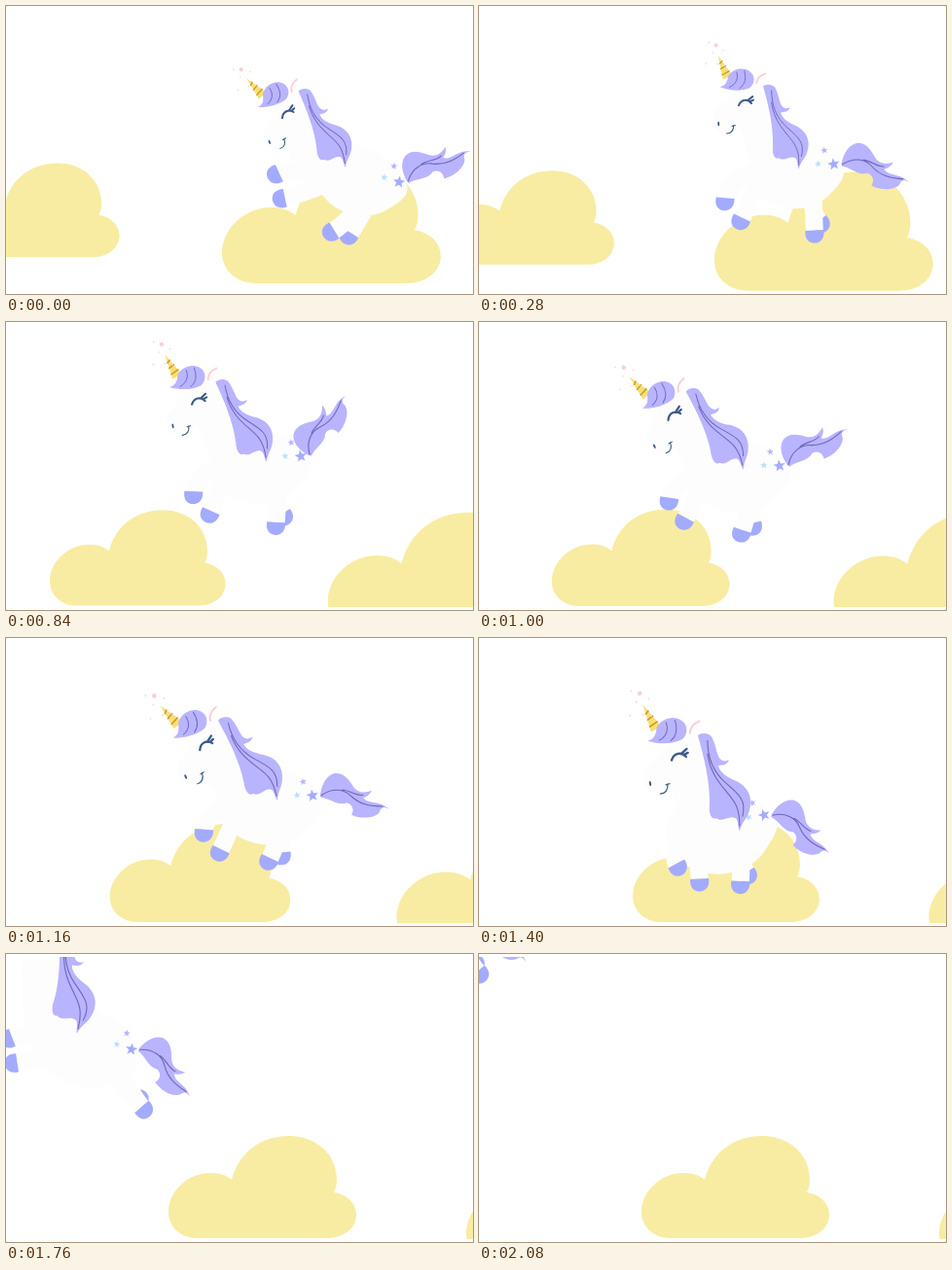
An HTML page with a canvas that plays this animation: 480x296 px, repeating every 2.12 s.

```html
<!DOCTYPE html>
<html lang="en">
<head>
<meta charset="utf-8">
<title>Unicorn hopping over clouds</title>
<style>
  html, body { margin: 0; width: 100%; height: 100%; overflow: hidden; background: #fff; }
  canvas { display: block; width: 480px; height: 296px; }
</style>
</head>
<body>
<canvas id="stage" width="480" height="296"></canvas>
<script>
const ctx = document.getElementById('stage').getContext('2d');
const LOOP = 2120, STEP = 40, PAN = 1440;
const LILAC = '#b9b4fe', HOOF = '#a3abfe', INK = '#6f68bd', NAVY = '#3c5b87',
      WHITE = '#fdfdfe', CLOUD = '#f8eca2', PINK = '#f9d0d8';

// Rump position and joint angles (degrees) at the key moments of the hop
const push = { kick: 45, reach: 100, neck: -8, tail: -25 };
const leap = { kick: -31, reach: 103, neck: 14, tail: 44 };
const POSES = [
  { t: 0, x: 404, y: 181, ...push },
  { t: 560, x: 329, y: 147, kick: -27, reach: 22, neck: 3, tail: 22 },
  { t: 840, x: 303, y: 138, kick: 3, reach: 48, neck: -9, tail: -58 },
  { t: 1160, x: 315, y: 162, kick: 20, reach: 50, neck: -13, tail: 12 },
  { t: 1400, x: 293, y: 182, kick: 2, reach: 22, neck: 0, tail: 35 },
  { t: 1760, x: 129, y: 98, ...leap },
  { t: 2080, x: -12, y: -41, ...leap },
];

const clamp01 = v => Math.max(0, Math.min(1, v));
const rad = deg => deg * Math.PI / 180;
const slope = (a, b, k) => (b[k] - a[k]) / (b.t - a.t);

// Smooth curve through one value of the poses
function dial(t, k) {
  let i = 0;
  while (i < POSES.length - 2 && t >= POSES[i + 1].t) i++;
  const a = POSES[i], b = POSES[i + 1], h = b.t - a.t, u = (t - a.t) / h, v = 1 - u;
  const mid = slope(a, b, k);
  const inner = j => slope(POSES[j - 1], POSES[j + 1], k);
  const out = i + 2 < POSES.length ? inner(i + 1) : 2 * mid - inner(i);
  const into = i > 0 ? inner(i) : 2 * mid - out;
  return a[k] * v * v * (1 + 2 * u) + b[k] * u * u * (3 - 2 * u) + h * u * v * (v * into - u * out);
}

const shape = d => new Path2D(d);
const puff = shape('M30 0C12 0 0-12 0-27C0-48 20-67 43-67C52-67 59-65 65-60C72-88 95-105 124-105' +
  'C152-105 173-86 173-60C173-55 172-51 170-47C183-45 193-36 193-24C193-10 180 0 163 0Z');
const torso = shape('M10 0C17 12 8 23-4 36C-16 50-34 54-50 54C-70 53-92 42-102 20C-106 0-96-20-75-25C-40-30-10-25 10 0Z');
const hoofShape = shape('M-9.500 0L9.500 0C10.500 9 5 13 0 13C-6 13-10.500 9-9.500 0Z');
const horn = shape('M166 67L184 90L173 95Z');
const stripes = shape('M168 77L171.500 73M169.500 83L176 78.500M171.500 90L180.500 84.500');
const fringe = shape('M169 104C176 103 178 98 179 91C184 82 196 79 204 84C212 89 211 99 205 104C195 109 180 108 169 104Z');
const fringeLines = shape('M181 104C190 100 191 92 189 86M193 105C201 99 200 91 198 84');
const ear = shape('M213 98C213 92 218 88 223 86');
const eye = shape('M193 125C196 117 204 117 208 122M203 119L209 114M206 120L210 118');
const smile = shape('M180 159C186 159 188 155 188 149M186 150L190 149');
const muzzle = shape('M180 143L205 118');
const neckLine = shape('M206 118L212 150L225 195');
const maneShape = shape('M221 101C224 98 231 98 235 102C239 109 240 117 242 122C245 128 249 128 253 126' +
  'C251 132 246 131 242 132C244 139 251 144 261 148C273 154 278 165 274 178C272 186 266 190 264 199' +
  'C262 196 263 189 260 186C253 182 247 191 240 186C235 188 232 181 233 172C234 150 227 122 221 101Z');
const maneLines = shape('M231 106C231 122 236 138 250 150C264 162 271 168 267 184' +
  'M231 120C235 148 253 158 260 172C264 180 264 187 264 194');
const tailShape = shape('M337 146C341 134 348 127 356 127C364 128 368 134 372 144C376 152 383 152 390 151' +
  'C387 155 384 156 380 157C384 165 396 162 404 173C399 169 396 170 394 174C388 180 373 178 365 172' +
  'C369 168 368 161 362 159C353 161 346 151 337 149Z');
const tailLines = shape('M338 147C350 141 362 144 368 153C376 164 387 167 398 169M360 145C368 147 373 154 380 154');

function fill(path, color) { ctx.fillStyle = color; ctx.fill(path); }
function line(path, color, width, cap = 'round') {
  ctx.strokeStyle = color;
  ctx.lineWidth = width;
  ctx.lineCap = cap;
  ctx.stroke(path);
}
function dot(x, y, r, color) {
  ctx.fillStyle = color;
  ctx.beginPath();
  ctx.arc(x, y, r, 0, 7);
  ctx.fill();
}
function star(x, y, r, color) {
  ctx.fillStyle = color;
  ctx.beginPath();
  for (let i = 0; i < 10; i++) {
    const a = i * Math.PI / 5 - 1.75, q = i % 2 ? r * .42 : r;
    ctx.lineTo(x + q * Math.cos(a), y + q * Math.sin(a));
  }
  ctx.fill();
}

function placed(x, y, deg, scale, draw) {
  ctx.save();
  ctx.translate(x, y);
  ctx.rotate(rad(deg));
  ctx.scale(scale, scale);
  draw();
  ctx.restore();
}

function clouds(t) {
  const u = clamp01(t / PAN), r = clamp01(t / 900), rise = r * r * (3 - 2 * r);
  placed(-61 + 228 * u ** 1.42, 258 + 34 * rise, 0, .92 + .08 * u ** 3, () => fill(puff, CLOUD));
  placed(222 + 251 * u ** 1.55, 285 + 33.5 * rise, 0, 1.165, () => fill(puff, CLOUD));
}

// Swing 0 hangs straight down, positive swings forward
function leg(jx, jy, length, swing, turn) {
  const x = jx - length * Math.sin(rad(swing)), y = jy + length * Math.cos(rad(swing));
  const limb = new Path2D();
  limb.moveTo(x, y);
  limb.quadraticCurveTo(x + 15 * Math.sin(rad(turn)), y - 15 * Math.cos(rad(turn)), jx, jy);
  line(limb, WHITE, 18, 'butt');
  placed(x, y, turn, 1, () => fill(hoofShape, HOOF));
}

function legs(kick, reach) {
  const fore = reach * .95 - 24, hind = kick * .85 - 8;
  leg(-70, 0, 54, reach, reach * 1.2 - 55);
  leg(-24, 8, 51, hind, kick * 1.5 - 35);
  leg(-70, 0, 70 - reach * .2, fore, fore * 1.1);
  leg(-22, 5, 63, kick, kick * 1.3);
}

function head() {
  line(muzzle, WHITE, 34);
  line(eye, NAVY, 2.4);
  line(smile, NAVY, 1.2);
  ctx.fillStyle = NAVY;
  ctx.beginPath();
  ctx.ellipse(170, 148, 1.1, 2.6, -.1, 0, 7);
  ctx.fill();
  fill(horn, '#f8df74');
  line(stripes, '#c99a2c', 1.6, 'butt');
  fill(fringe, LILAC);
  line(fringeLines, INK, 1);
  line(ear, PINK, 2.2);
  dot(163, 55, 2.4, PINK);
  for (let i = 0; i < 6; i++)
    dot(163 + 11 * Math.cos(i * 1.9), 66 + 14 * Math.sin(i * 1.3 + 2), .9, PINK);
}

function unicorn(t) {
  const [x, y, kick, reach, neck, tail] =
    ['x', 'y', 'kick', 'reach', 'neck', 'tail'].map(k => dial(t, k));
  const size = .86 + .14 * clamp01(t / 1400) ** 2;
  const lift = (reach - 40) / 60, pitch = 20 * lift - 2;
  const nod = Math.max(-17, -1.2 * kick);

  placed(x, y, 0, 1, () => {
    placed(0, 0, pitch, size, () => fill(torso, WHITE));
    legs(kick, reach);
    placed(8, -1, tail - 22, 1, () => {
      ctx.translate(-337, -146);
      fill(tailShape, LILAC);
      line(tailLines, INK, 1.1);
    });
    placed(0, 0, pitch, 1, () => {
      star(0, 0, 6.5, HOOF);
      star(-10, -14, 3.8, LILAC);
      star(-16, 0, 3.8, '#b9e0fd');
    });
    placed(-32 - 23 * lift, 9 - 24 * lift, neck, size, () => {
      ctx.translate(-264, -199);
      line(neckLine, WHITE, 36);
      // The head nods about the top of the mane
      placed(227, 100, nod - neck, 1, () => {
        ctx.translate(-227, -100);
        head();
      });
      fill(maneShape, LILAC);
      line(maneLines, INK, 1.1);
    });
  });
}

function frame(now) {
  const t = Math.floor(now % LOOP / STEP) * STEP;
  ctx.fillStyle = '#fff';
  ctx.fillRect(0, 0, 480, 296);
  ctx.save();
  ctx.beginPath();
  ctx.rect(0, 3, 480, 290);
  ctx.clip();
  ctx.lineJoin = 'round';
  clouds(t);
  unicorn(t);
  ctx.restore();
}

const start = performance.now();
function tick() {
  frame(performance.now() - start);
  requestAnimationFrame(tick);
}
tick();
</script>
</body>
</html>
```
